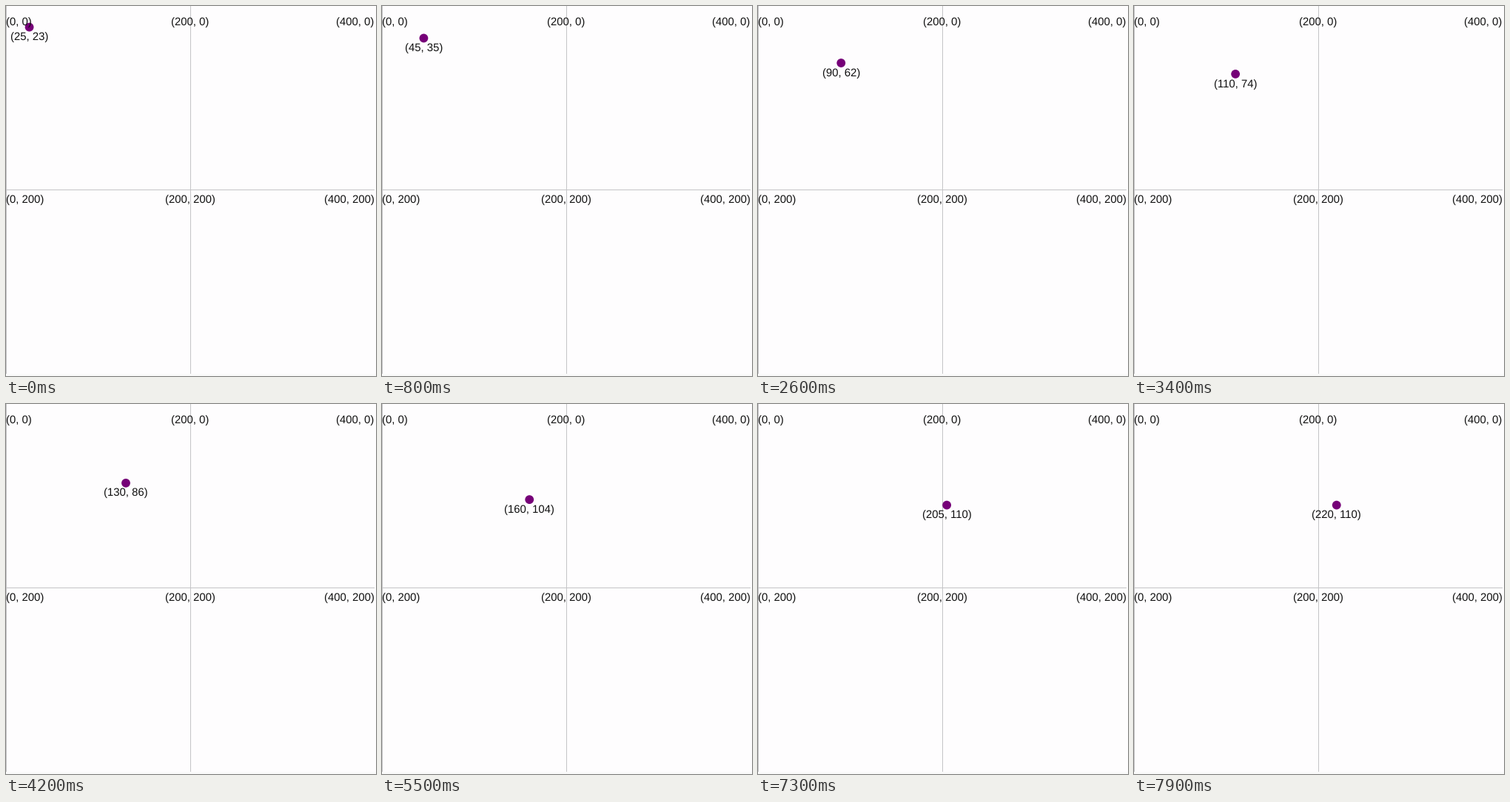
Animation, 500 px wide and 500 px high, one loop 8000 ms. Source, as a matplotlib script:

```python
import matplotlib.pyplot as plt
from matplotlib.animation import FuncAnimation
from matplotlib.patches import Circle, Rectangle

SIZE = 500
DPI = 100
TICK = 100       # ms per frame
LOOP = 8000
SCALE = 1.242    # pixels per coordinate unit
LINE = "#c4c4c6"
INK = "#101010"
PURPLE = "#760078"

plt.rcParams["font.family"] = "Liberation Sans"
plt.rcParams["text.hinting"] = "none"
FONT = 12 * SCALE * 72 / DPI

fig = plt.figure(figsize=(SIZE / DPI, SIZE / DPI), dpi=DPI, facecolor="#fefdfe")
ax = fig.add_axes([0, 0, 1, 1])
ax.set_xlim(0, SIZE)
ax.set_ylim(SIZE, 0)
ax.axis("off")


def bar(x, y, w, h, color=LINE):
    ax.add_patch(Rectangle((x, y), w, h, fc=color, lw=0, zorder=1))


def label(x, y, text, align="center"):
    return ax.text(x, y, text, fontsize=FONT, color=INK, ha=align,
                   va="baseline", zorder=3)


def caption(x, y):
    return f"({x}, {y})"


# Grid
bar(0, 497, SIZE, 3, "#fafafa")
bar(0, 0, 1, 497)
bar(249, 0, 1, 497)
bar(0, 248, 498, 1)

# Fixed coordinates
for gy, base in ((0, 26), (200, 266)):
    label(0, base, caption(0, gy), "left")
    label(249, base, caption(200, gy))
    label(497.5, base, caption(400, gy), "right")

dot = ax.add_patch(Circle((0, 0), 5.9, fc=PURPLE, lw=0, zorder=2))
tag = label(0, 0, "")


def steps_at(t):
    # one position is held 100 ms longer than the rest
    return (t - 100 if t > 4600 else t) // 200


def draw(frame):
    n = steps_at(frame * TICK)
    x = 25 + 5 * n
    y = min(23 + 3 * n, 110)
    px, py = 0.5 + SCALE * x, SCALE * y
    dot.center = (px, py)
    tag.set_position((px, py + 17.5))
    tag.set_text(caption(x, y))
    return dot, tag


anim = FuncAnimation(fig, draw, frames=LOOP // TICK, interval=TICK,
                     init_func=lambda: draw(0), repeat=True, repeat_delay=0)
plt.show()
```
